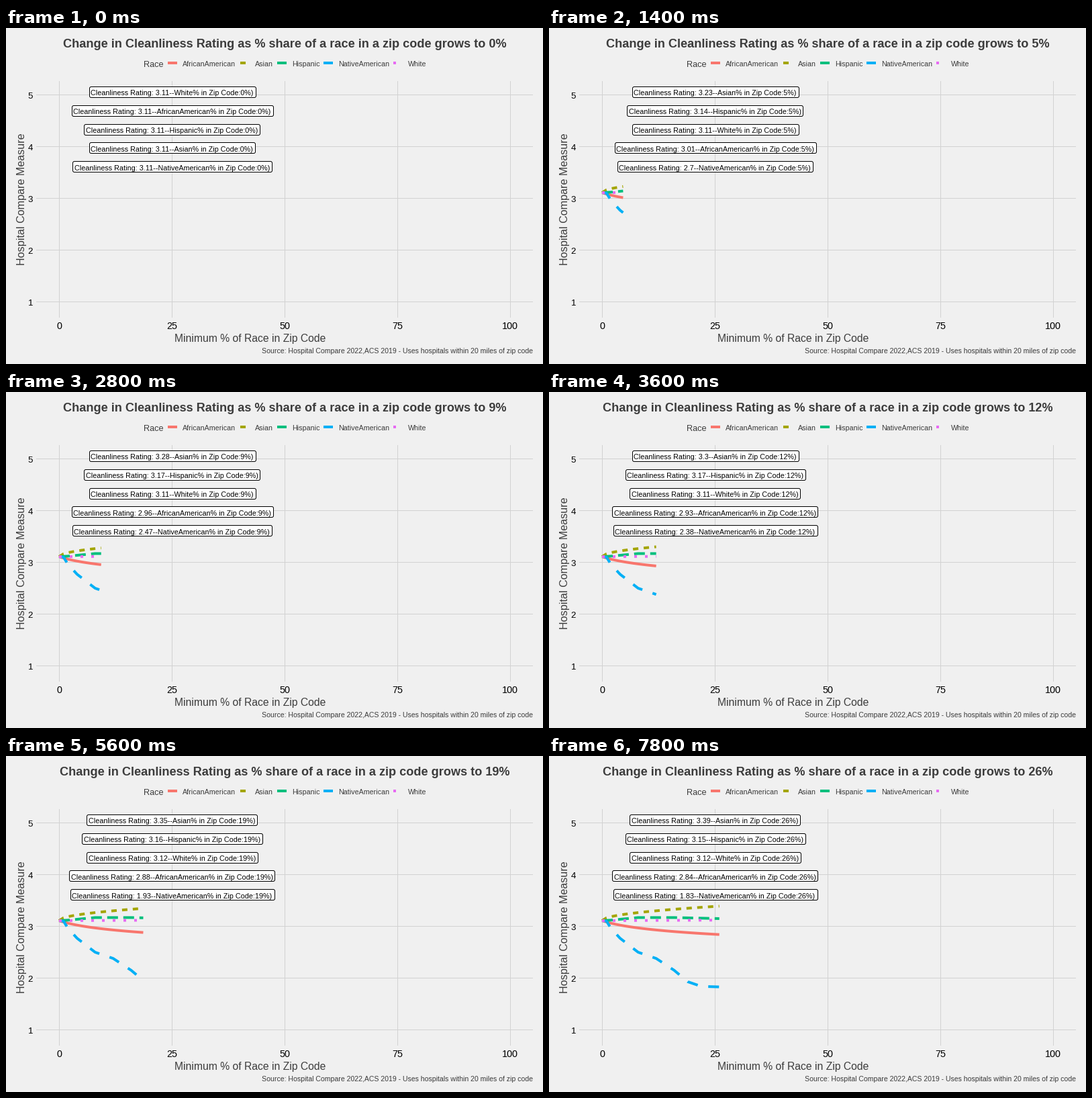
A matplotlib script that plays this animation: 800 px wide and 500 px high, repeating every 8 s.

```python
import numpy as np
import matplotlib.pyplot as plt
from matplotlib.animation import FuncAnimation
from matplotlib.patches import FancyBboxPatch

W, H, DPI = 800, 500, 100
FRAMES, INTERVAL = 40, 200
STEP = 2 / 3  # percent revealed per frame
PT = 72 / DPI  # points per pixel
INK, GRID, PAPER = "#3C3C3C", "#D2D2D2", "#F0F0F0"
BASE = 3.11

plt.rcParams["font.family"] = "Liberation Sans"


def african_american(p):
    return BASE - 0.147 * np.log1p(p / 5)


def asian(p):
    return BASE + 0.055 * np.sqrt(p)


def hispanic(p):
    return np.interp(p, [0, 2, 8, 16, 26], [BASE, 3.12, 3.17, 3.17, 3.15])


def native_american(p):
    return np.interp(p, [0, 1, 2, 4, 8, 12, 16, 19, 22, 26],
                     [BASE, 3.1, 2.96, 2.77, 2.5, 2.38, 2.15, 1.93, 1.84, 1.83])


def white(p):
    return BASE + 0.0004 * p


# name, colour, dashes, legend key x, rating curve
SERIES = [
    ("AfricanAmerican", "#F8766D", "solid", 241, african_american),
    ("Asian", "#A3A500", (0, (2, 2)), 349, asian),
    ("Hispanic", "#00BF7D", (0, (4, 2)), 404, hispanic),
    ("NativeAmerican", "#00B0F6", (0, (4, 4)), 473, native_american),
    ("White", "#E76BF3", (0, (1, 3)), 577, white),
]
TIED = ["White", "AfricanAmerican", "Hispanic", "Asian", "NativeAmerican"]

PCT = np.arange(27)
RATES = np.array([s[-1](PCT) for s in SERIES])
RANKS = np.argsort(np.argsort(-RATES, axis=0), axis=0)
RANKS[:, 0] = [TIED.index(s[0]) for s in SERIES]


def px(pct):
    return 79 + 6.72 * pct


def py(rate):
    return 253.5 - 77 * (rate - 3)


fig = plt.figure(figsize=(W / DPI, H / DPI), dpi=DPI, facecolor=PAPER)
ax = fig.add_axes([0, 0, 1, 1])
ax.set_xlim(0, W)
ax.set_ylim(H, 0)
ax.axis("off")


def write(x, y, text, size, color=INK, ha="left", **kw):
    return ax.text(x, y, text, fontsize=size * PT, color=color, ha=ha,
                   va="baseline", rotation_mode="anchor", **kw)


def stroke(xs, ys, color, width, style="solid", z=2):
    return ax.plot(xs, ys, color=color, lw=width * PT, ls=style, zorder=z,
                   snap=False, solid_capstyle="butt", dash_capstyle="butt")[0]


# grid and axes
for rate in range(1, 6):
    y = py(rate)
    stroke([45, 785], [y, y], GRID, 1, z=1)
    write(40, y + 5.2, str(rate), 13.2, "black", ha="right")
for pct in range(0, 101, 25):
    x = px(pct)
    stroke([x + 0.5, x + 0.5], [79, 431], GRID, 1, z=1)
    write(x, 448, str(pct), 14.4, "black", ha="center")
write(364, 467, "Minimum % of Race in Zip Code", 15.7, ha="center")
write(28, 254.5, "Hospital Compare Measure", 16.1, ha="center", rotation=90)
write(785, 484, "Source: Hospital Compare 2022,ACS 2019 - "
      "Uses hospitals within 20 miles of zip code", 10.53, ha="right")

# legend
write(204.5, 58, "Race", 12.8)
for name, color, style, x, _ in SERIES:
    stroke([x, x + 14], [52, 52], color, 4, style)
    write(x + 22, 57, name, 10.6)

# moving parts
title = write(415, 29, "", 18.15, ha="center", weight="bold")
lines, boxes, tags = [], [], []
for i, (_, color, style, *_) in enumerate(SERIES):
    lines.append(stroke([], [], color, 4, style, z=3 + i))
    boxes.append(ax.add_patch(FancyBboxPatch(
        (0, 0), 1, 1, boxstyle="round,pad=0,rounding_size=2.5", fc="white",
        ec="black", lw=PT, snap=False, zorder=10 + 2 * i)))
    tags.append(write(247.3, 0, "", 10.75, "black", ha="center",
                      zorder=11 + 2 * i))


def draw(frame):
    now = frame * STEP
    whole = round(now)
    title.set_text("Change in Cleanliness Rating as % share of a race "
                   f"in a zip code grows to {whole}%")
    xs = np.append(PCT[PCT < now - 1e-9], now)
    for i, (name, *_) in enumerate(SERIES):
        lines[i].set_data(px(xs), py(np.interp(xs, PCT, RATES[i])))
        rating = f"{round(RATES[i, whole], 2):g}"
        tags[i].set_text(f"Cleanliness Rating: {rating}--{name}% "
                         f"in Zip Code:{whole}%)")
        top = np.floor(87.4 + 27.8 * np.interp(now, PCT, RANKS[i])) + 0.5
        tags[i].set_y(top + 13)
        extent = tags[i].get_window_extent()
        width = round(extent.transformed(ax.transData.inverted()).width + 5.5)
        boxes[i].set_bounds(round(247.5 - width / 2) + 0.5, top, width, 16)
    return [title, *lines, *boxes, *tags]


anim = FuncAnimation(fig, draw, frames=FRAMES, interval=INTERVAL,
                     init_func=lambda: draw(0), repeat=True, repeat_delay=0,
                     blit=False)
plt.show()
```
